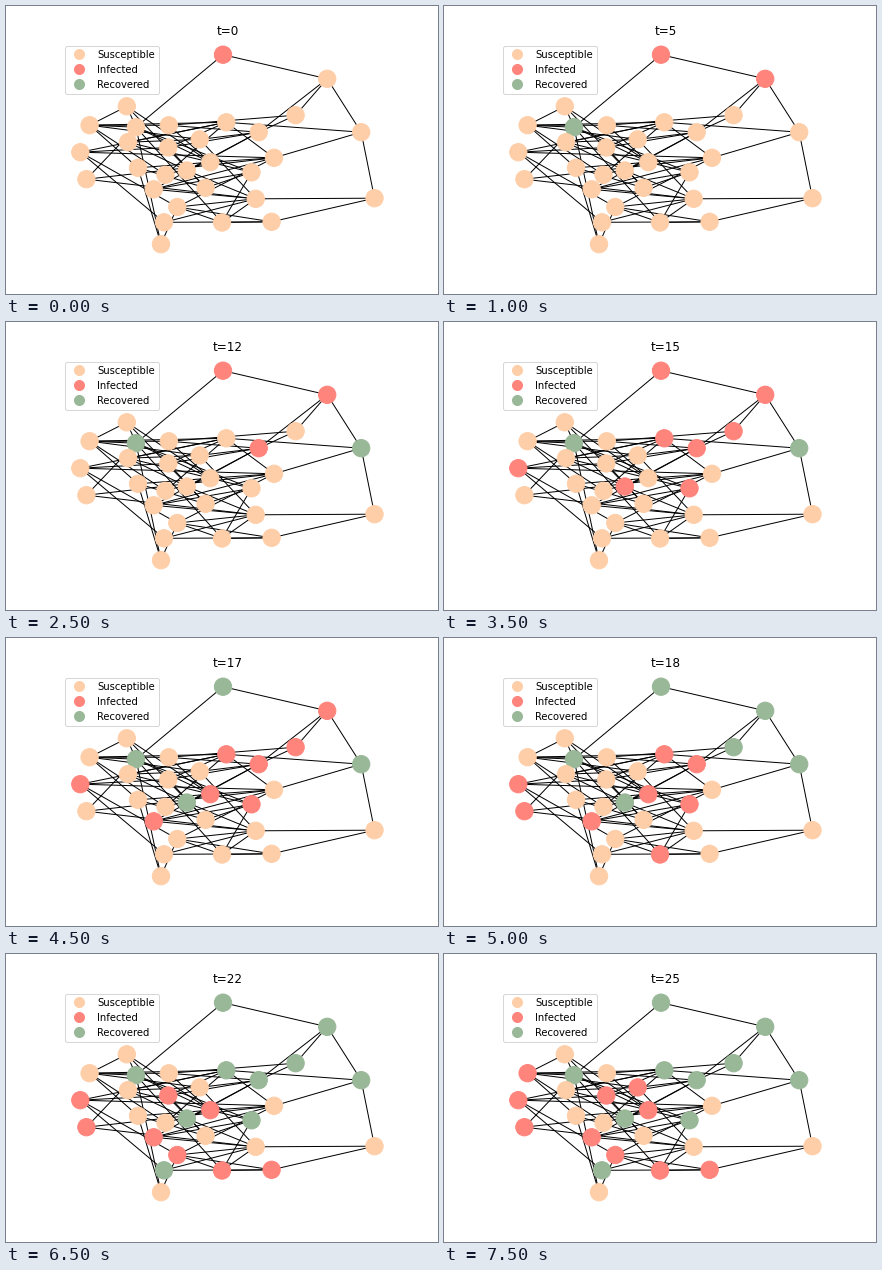
Write a matplotlib script that moves like this. It is 432x288 px and loops after 8000 ms.

```python
import math
import random
from itertools import combinations, pairwise

import matplotlib.pyplot as plt
import numpy as np
from matplotlib.animation import FuncAnimation
from matplotlib.collections import LineCollection
from matplotlib.lines import Line2D

W, H, DPI = 432, 288, 72
STEPS = 16
GROUPS = {"Susceptible": "#FECEA8", "Infected": "#FF847C", "Recovered": "#99B898"}
HEALTHY, SICK, IMMUNE = GROUPS.values()

# Node centres in pixels (y down), in the order of infection.
NODES = [
    (217, 48.7), (130, 121.2), (321.2, 72.8), (252.7, 126.2), (355.2, 126.2),
    (220.3, 116.3), (289.6, 109.2), (74.3, 146.2), (180.8, 164.5), (245.5, 166.3),
    (204.3, 156.2), (147.7, 183.3), (80.4, 173.2), (216, 216.5), (162.3, 141.5),
    (158, 216.3), (265.6, 215.8), (171.3, 201), (83.6, 119.2), (193.7, 133.4),
    (120.8, 100.3), (162.8, 119.3), (122, 136.2), (268, 151.8), (132, 161.8),
    (159.5, 168.8), (199.6, 181.8), (249.7, 192.8), (368.5, 192.2), (155, 238.2),
]
RIM = {0, 2, 4, 16, 28, 29}

# Chains of linked nodes that shape the outline of the network.
CHAINS = [
    (1, 0, 2, 4, 28, 16, 13, 9), (6, 2, 3), (5, 4, 23), (28, 27, 17, 16, 15),
    (27, 13), (24, 29, 17), (29, 1), (18, 5, 7, 23, 12, 27), (20, 1), (6, 21),
]

RECOVERY_ORDER = (1, 4, 0, 8, 2, 6, 5, 3, 9, 15)
INFECTED = (1, 2, 3, 4, 5, 5, 7, 10, 12, 12, 14, 17, 17, 18, 19, 20)
RECOVERED = (0, 0, 1, 1, 1, 2, 2, 2, 2, 4, 6, 9, 10, 10, 10, 10)


def build_links():
    """Outline chains plus seeded, mostly sideways links inside the core."""
    links = {tuple(sorted(p)) for chain in CHAINS for p in pairwise(chain)}

    def fits(a, b):
        dx, dy = (abs(p - q) for p, q in zip(NODES[a], NODES[b]))
        return 40 < math.hypot(dx, dy) < 130 and dy < 1.2 * dx

    core = [n for n in range(len(NODES)) if n not in RIM]
    pairs = [p for p in combinations(core, 2) if fits(*p) and p not in links]
    return sorted(links) + random.Random(7).sample(pairs, 44)


def clock(step):
    return round(np.interp(step, (0, 3, 5, 7, 9, 11, 15), (0, 8, 12, 15, 17, 20, 25)))


def node_colors(step):
    immune = RECOVERY_ORDER[:RECOVERED[step]]
    return [IMMUNE if n in immune else SICK if n < INFECTED[step] else HEALTHY
            for n in range(len(NODES))]


plt.rcParams["font.family"] = "DejaVu Sans"
fig = plt.figure(figsize=(W / DPI, H / DPI), dpi=DPI, facecolor="white")
ax = fig.add_axes([0.125, 0.125, 0.775, 0.755])
ax.set_xlim(0.125 * W, 0.9 * W)
ax.set_ylim(0.875 * H, 0.12 * H)
ax.axis("off")

lines = [(NODES[a], NODES[b]) for a, b in build_links()]
ax.add_collection(LineCollection(lines, colors="black", linewidths=1, zorder=1),
                  autolim=False)
dots = ax.scatter(*zip(*NODES), s=300, linewidths=1, zorder=2, clip_on=False)
title = ax.set_title("t=0", fontsize=12)

handles = [Line2D([], [], linestyle="none", marker="o", markersize=10,
                  color=color, label=name) for name, color in GROUPS.items()]
ax.legend(handles=handles, loc="upper left", fontsize=10)


def update(step):
    dots.set_color(node_colors(step))
    title.set_text(f"t={clock(step)}")
    return dots, title


anim = FuncAnimation(fig, update, frames=STEPS, interval=500,
                     repeat=True, repeat_delay=0, blit=False)
plt.show()
```
